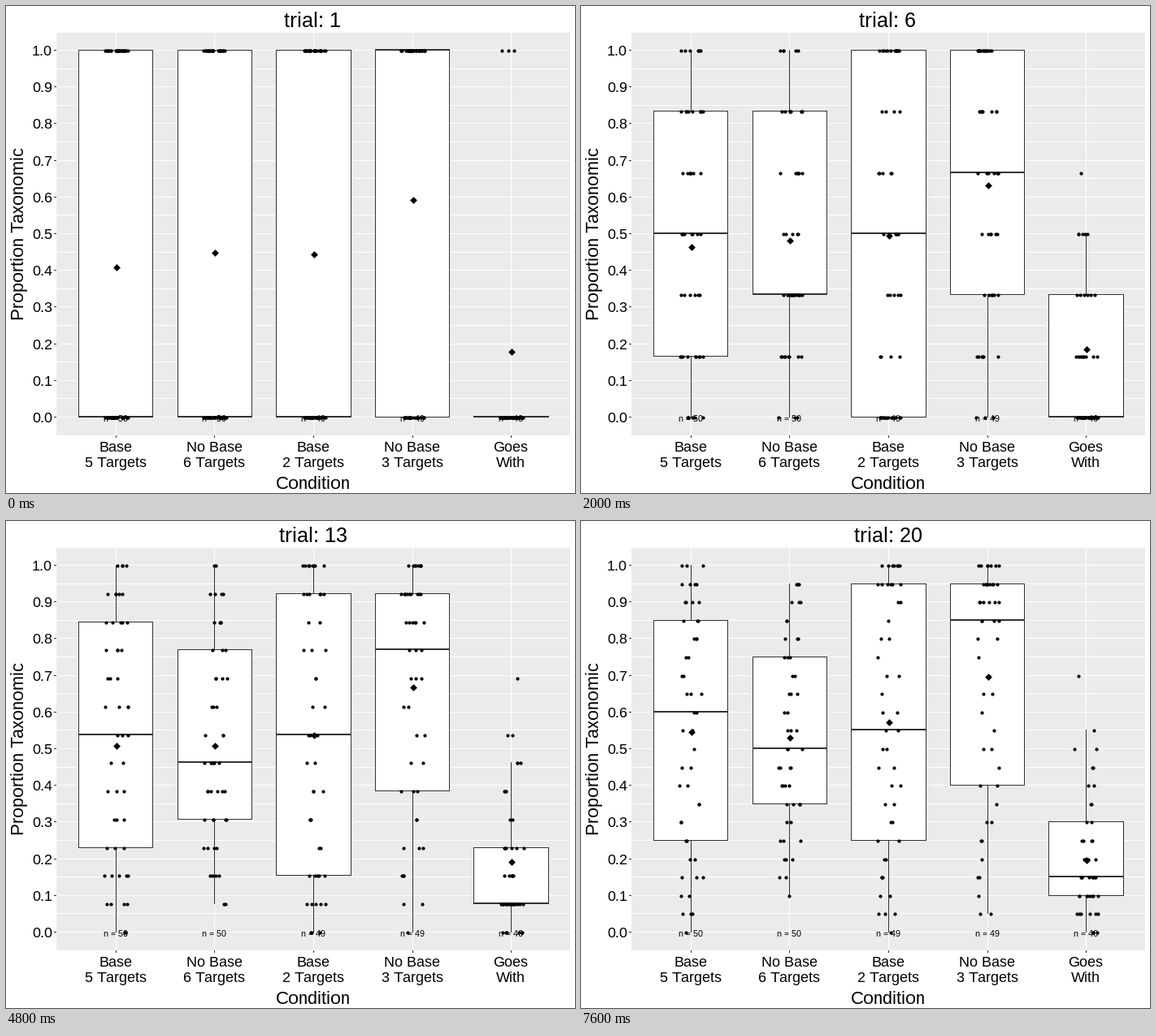
These frames come from a looping animation (700x600 px, 8 s). A matplotlib script:

```python
import numpy as np
import matplotlib.pyplot as plt
from matplotlib.animation import FuncAnimation
from matplotlib.patches import Rectangle

W, H, DPI = 700, 600, 100
PT = 72 / DPI
TRIALS, INTERVAL = 20, 400
LEFT, RIGHT, TOP, BOTTOM = 62, 694, 33, 529
STEP = (RIGHT - LEFT) / 5.2
HALF_BOX = 0.375 * STEP
JITTER = 0.12 * STEP
DARK = "#333333"
RANKS = [0, .25, .5, .75, .97, 1]

plt.rcParams.update({"font.family": "Liberation Sans",
                     "text.hinting": "native", "text.hinting_factor": 1})


def nearest(value):
    """Round to whole numbers, halves downwards."""
    return np.ceil(np.asarray(value) - 0.51)


def row(share):
    return nearest(506 - 452 * np.asarray(share))


class Condition:
    """A group whose quantiles and mean drift from early to late values."""

    def __init__(self, names, size, mean, early, late):
        self.names, self.size, self.mean = names, size, mean
        self.early, self.late = np.array(early), np.array(late)

    def mean_at(self, trial):
        start, end = self.mean
        return start + (end - start) * ((trial - 1) / (TRIALS - 1)) ** 0.7

    def summary(self, trial):
        """Whisker ends, quartiles and all shares, in steps of 1 / trial."""
        ease = max(0, np.log(trial / 4) / np.log(TRIALS / 4))
        curve = self.early + (self.late - self.early) * ease
        low, q1, med, q3, high, _ = nearest(curve * trial) / trial
        fence = np.floor((2.5 * q3 - 1.5 * q1) * trial + 1e-6) / trial
        ranks = (np.arange(self.size) + 0.5) / self.size
        shares = nearest(np.interp(ranks, RANKS, curve) * trial) / trial
        return low, q1, med, q3, max(q3, min(high, fence)), shares


CONDITIONS = [
    Condition(("Base", "5 Targets"), 50, (.41, .547),
              (0, .16, .5, .78, 1, 1), (0, .25, .6, .86, 1, 1)),
    Condition(("No Base", "6 Targets"), 50, (.45, .531),
              (0, .25, .37, .76, 1, 1), (.11, .35, .5, .75, .955, .955)),
    Condition(("Base", "2 Targets"), 49, (.445, .574),
              (0, 0, .5, .92, 1, 1), (0, .25, .55, .95, 1, 1)),
    Condition(("No Base", "3 Targets"), 49, (.592, .697),
              (0, .3, .63, .92, 1, 1), (.03, .4, .85, .95, 1, 1)),
    Condition(("Goes", "With"), 46, (.18, .196),
              (0, 0, 0, .25, .55, .75), (0, .1, .15, .276, .55, .75)),
]
CENTERS = LEFT + STEP * (0.6 + np.arange(len(CONDITIONS)))

fig = plt.figure(figsize=(W / DPI, H / DPI), dpi=DPI, facecolor="white")
ax = fig.add_axes([0, 0, 1, 1])
ax.set_xlim(0, W)
ax.set_ylim(H, 0)
ax.axis("off")


def text(x, y, s, size, **kw):
    kw = {"ha": "center", "va": "baseline", **kw}
    return ax.text(x, y, s, fontsize=size * PT, color="black", **kw)


def line(xs, ys, color, width=1, z=1):
    return ax.plot(xs, ys, color=color, lw=width * PT, zorder=z, snap=False,
                   antialiased=False, solid_capstyle="butt")[0]


def markers(shape, size):
    return ax.scatter(CENTERS, CENTERS, marker=shape, s=(size * PT) ** 2,
                      color="black", linewidths=0, zorder=5, snap=False,
                      antialiased=False)


ax.add_patch(Rectangle((LEFT, TOP), RIGHT - LEFT, BOTTOM - TOP,
                       fc="#EBEBEB", ec="none", zorder=0))
for i in range(-1, 22):
    y = row(i / 20) + 0.5
    line([LEFT, RIGHT], [y, y], "white")
for i in range(11):
    y = row(i / 10) + 0.5
    line([LEFT - 3, LEFT], [y, y], DARK)
    text(57, y + 6.5, f"{i / 10:.1f}", 18, ha="right")

whiskers, boxes, medians = [], [], []
for x, cond in zip(CENTERS, CONDITIONS):
    mid, left, right = nearest([x, x - HALF_BOX, x + HALF_BOX]) + 0.5
    line([mid, mid], [TOP, BOTTOM], "white")
    line([mid, mid], [BOTTOM, BOTTOM + 3], DARK)
    for i, name in enumerate(cond.names):
        text(x, 549 + 19 * i, name, 18)
    text(x, 512, f"n = {cond.size}", 11, zorder=6)
    whiskers.append(line([mid, mid], [0, 0], DARK, z=2))
    boxes.append(ax.add_patch(Rectangle(
        (left, 0), right - left, 0, fc="white", ec=DARK, lw=PT, zorder=3,
        antialiased=False, snap=False)))
    medians.append(line([left, right], [0, 0], DARK, 2, z=4))

text(378, 595, "Condition", 22)
text(22.5, 280.5, "Proportion Taxonomic", 22, rotation=90,
     rotation_mode="anchor")
title = text(377.5, 26, "", 26)
dots = markers("o", 4.2)
diamonds = markers("D", 6.2)


def update(frame):
    trial = frame + 1
    rng = np.random.default_rng(trial)
    title.set_text(f"trial: {trial}")
    points, means = [], []
    for i, (x, cond) in enumerate(zip(CENTERS, CONDITIONS)):
        low, q1, med, q3, high, shares = cond.summary(trial)
        whiskers[i].set_ydata(row([low, high]) + 0.5)
        boxes[i].set_y(row(q3) + 0.5)
        boxes[i].set_height(row(q1) - row(q3))
        medians[i].set_ydata([row(med)] * 2)
        jitter = rng.uniform(-JITTER, JITTER, cond.size)
        points.append(np.column_stack([nearest(x + jitter), row(shares)]))
        means.append((nearest(x), row(cond.mean_at(trial))))
    dots.set_offsets(np.vstack(points) + 0.5)
    diamonds.set_offsets(np.array(means) + 0.5)
    return [title, dots, diamonds, *whiskers, *boxes, *medians]


anim = FuncAnimation(fig, update, frames=TRIALS, interval=INTERVAL,
                     repeat=True, repeat_delay=0, blit=False)
plt.show()
```
